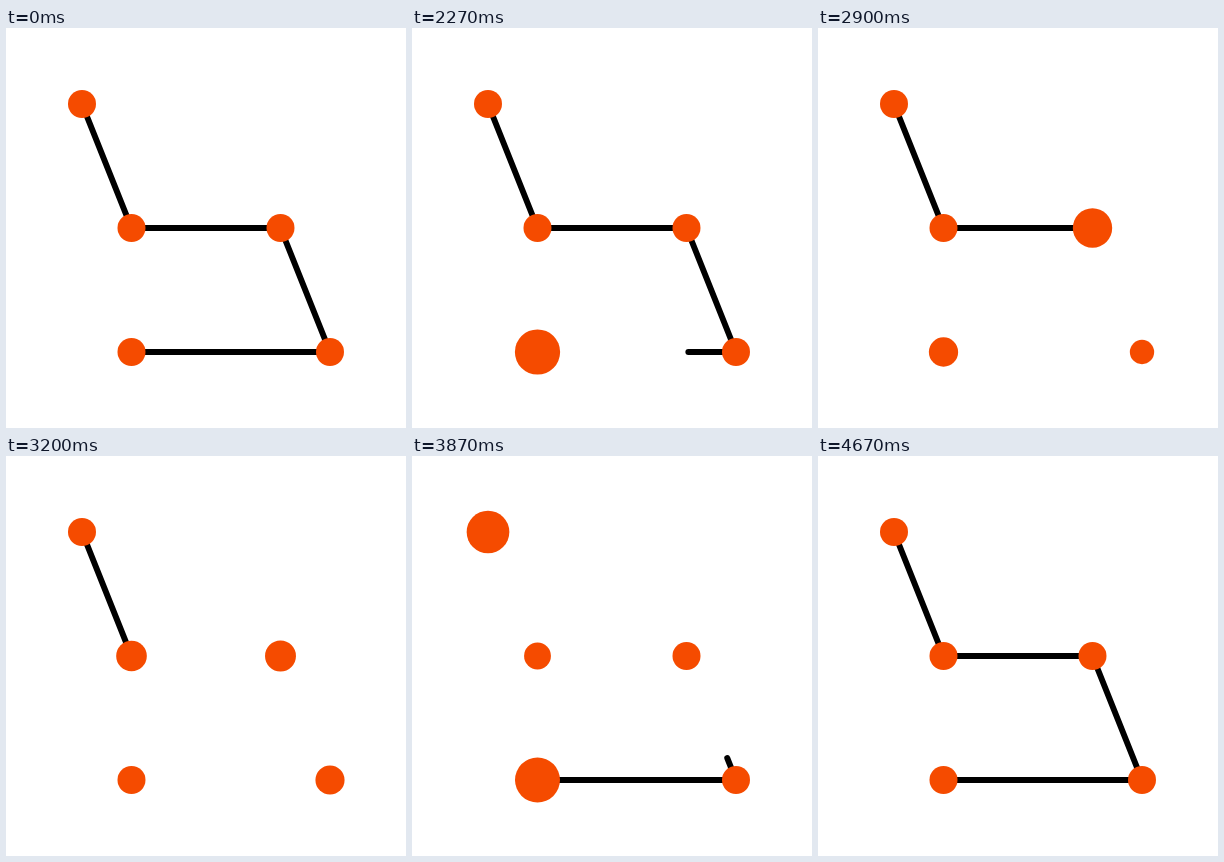
An HTML page with a canvas for the animation above (4700 ms loop, 400x400 px).

```html
<!DOCTYPE html>
<html lang="en">
<head>
<meta charset="utf-8">
<title>Connected dots</title>
<style>
  html, body { margin: 0; height: 100%; overflow: hidden; background: #fff; }
  canvas { display: block; }
</style>
</head>
<body>
<canvas width="400" height="400"></canvas>
<script>
const LOOP = 4700;
const ERASE_START = 1995, STEP = 390, ERASE_TIME = 440;
const DRAW_START = 3590, DRAW_TIME = 640;
const RADIUS = 14;
const points = [[125.5, 324], [324, 324], [274.5, 200], [125.5, 200], [76, 76]];
const lengths = points.slice(1).map(([x, y], i) => Math.hypot(x - points[i][0], y - points[i][1]));
const total = lengths.reduce((a, b) => a + b);

const ctx = document.querySelector('canvas').getContext('2d');
ctx.lineWidth = 6;
ctx.lineCap = 'round';

const clamp = v => Math.min(1, Math.max(0, v));
const lerp = (a, b, u) => a + (b - a) * u;
const between = (p, q, u) => [lerp(p[0], q[0], u), lerp(p[1], q[1], u)];

function easeInOut(u) {
  return u < 0.5 ? 0.5 * (2 * u) ** 2.5 : 1 - 0.5 * (2 - 2 * u) ** 2.5;
}

// Extra radius of a springy pulse: [time, offset] at its turning points
const swings = [[240, 9], [540, -2], [860, 0.7], [1110, 0]];
function pulse(t) {
  if (t <= 0) return 0;
  const [rise, peak] = swings[0];
  if (t < rise) {
    const u = t / rise;
    return peak * (0.8 * u + 1.4 * u * u - 1.2 * u ** 3);
  }
  const next = swings.findIndex(([time]) => t < time);
  if (next < 0) return 0;
  const [t0, a] = swings[next - 1], [t1, b] = swings[next];
  return lerp(a, b, (1 - Math.cos(Math.PI * (t - t0) / (t1 - t0))) / 2);
}

function segment(i, from, to) {
  if (from >= to) return;
  ctx.beginPath();
  ctx.moveTo(...between(points[i], points[i + 1], from));
  ctx.lineTo(...between(points[i], points[i + 1], to));
  ctx.stroke();
}

function render(t) {
  ctx.fillStyle = '#fff';
  ctx.fillRect(0, 0, 400, 400);

  let drawn = total * easeInOut(clamp((t - DRAW_START) / DRAW_TIME));
  lengths.forEach((length, i) => {
    const erased = easeInOut(clamp((t - ERASE_START - i * STEP) / ERASE_TIME));
    segment(i, erased, 1);
    segment(i, 0, clamp(drawn / length));
    drawn -= length;
  });

  ctx.fillStyle = '#f54b00';
  points.forEach(([x, y], i) => {
    let radius = RADIUS + pulse(t - ERASE_START - i * STEP);
    if (i === 0) radius += pulse(t - DRAW_START);
    ctx.beginPath();
    ctx.arc(x, y, radius, 0, 2 * Math.PI);
    ctx.fill();
  });
}

const start = performance.now();
function tick() {
  render((performance.now() - start) % LOOP);
  requestAnimationFrame(tick);
}
tick();
</script>
</body>
</html>
```
